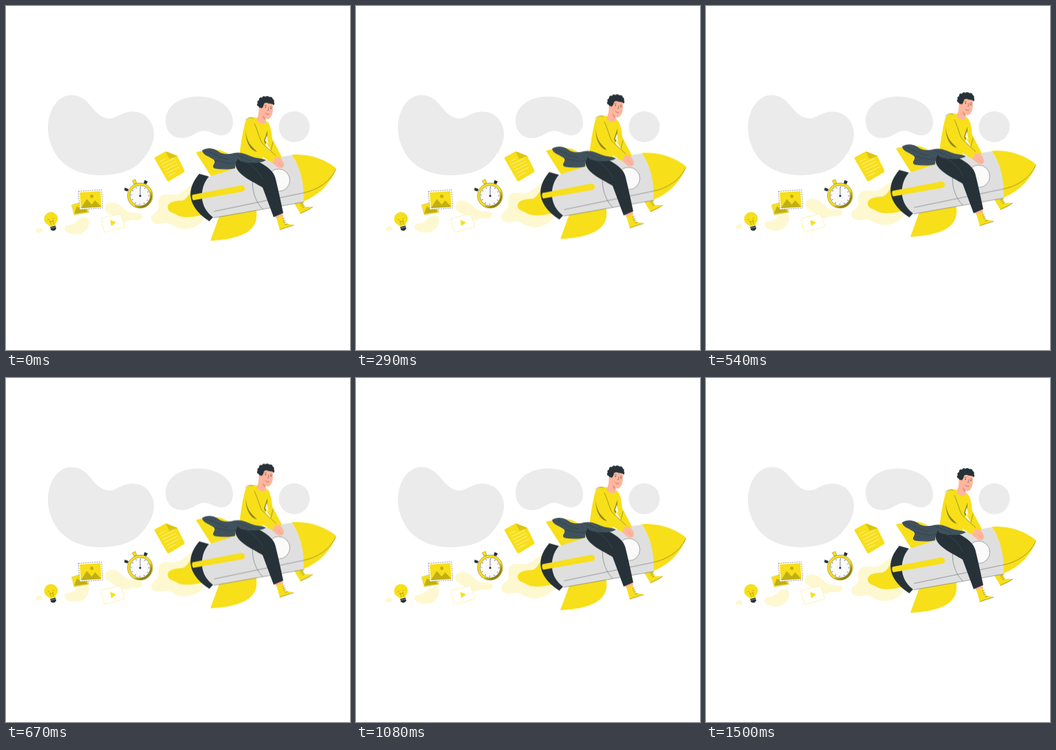
Animation, 500 px wide and 500 px high, one loop 1.54 s. Source, as an HTML page:

```html
<!DOCTYPE html>
<html lang="en">
<head>
<meta charset="utf-8">
<title>Rocket ride</title>
<style>
  html, body { margin: 0; width: 100%; height: 100%; overflow: hidden; background: #fff; }
  svg { display: block; width: 100%; height: 100%; }
  .float { animation: float 1540ms -40ms cubic-bezier(.37, 0, .63, 1) infinite; }
  @keyframes float {
    0%, 100% { transform: translateY(.9px); }
    50% { transform: translateY(-5.7px); }
  }
  .cloud { fill: #ebebeb; }
  .puff { fill: #fdf8d0; }
  .yellow { fill: #f7df1a; }
  .olive { fill: #c2af16; }
  .shade { fill: #8f8112; }
  .dark { fill: #263238; }
  .skin { fill: #ffb59d; }
  .line { fill: none; stroke: #263238; stroke-width: .6; stroke-linecap: round; stroke-linejoin: round; }
  .thin { stroke-width: .4; }
  .white { fill: none; stroke: #fdf3a8; stroke-width: .9; }
</style>
</head>
<body>
<svg viewBox="0 0 500 500">
  <defs>
    <pattern id="denim" width="5" height="4" patternUnits="userSpaceOnUse" patternTransform="rotate(24)">
      <rect width="5" height="4" fill="#3c4d57"/>
      <path d="M.5 1h1.400M3 2.800h1.300" stroke="#7d909a" stroke-width=".5"/>
    </pattern>
  </defs>

  <g class="cloud">
    <path d="M95 129.500C115 129.500 122 146 133 156C142 164 151 166 162 160C171 155 177 153.500 184 153.500C203 153.500 215 169 215 186C215 203 203 220 192 230C179 241 158 246 137 246C104 246 80 231 70 211C63 198 61 187 61 177C61 152 75 129.500 95 129.500Z"/>
    <path d="M278 131.500C306 131 330 146 330 169C330 181 322 188 313 188C303 188 298 181.500 288 181.500C276 181.500 271 192 256 192C241 192 232 181 232 167C232 144 254 132 278 131.500Z"/>
    <circle cx="419" cy="175.500" r="22.500"/>
  </g>

  <!-- smoke trail -->
  <g class="float puff">
    <path d="M43 326C43 323 46 324 47 322C50 321 52 322 53 325C54 328 51 329 48 328.500C45 329 43 329 43 326Z"/>
    <path d="M85 321C87 316 94 319 99 315C104 311 107 306 115 306C121 306 122 313 120 318C117 326 111 331 102 331C93 331 84 328 85 321Z"/>
    <path d="M144.500 291C146 285 153 283 160 285.500C168 288 171 296 180 299C189 301 198 299 198.500 305C198 311 190 311 184 310C178 310 176 314 170 313C162 311 158 305 151 302C145 299 143 295 144.500 291Z"/>
    <path d="M272 259C262 262 258 270 249 273C240 275 230 270 224 276C219 282 223 290 221 295C218 300 211 302 211 308C211 316 221 317 230 315C240 313 243 322 258 323C272 324 283 316 288 309L286 260Z"/>
    <path class="yellow" d="M274 267C265 269 265 280 256 282C246 282 236 284 235 291C235 299 242 299 247 302C254 307 264 306 272 305.500L290 302Z"/>
  </g>

  <!-- light bulb -->
  <g transform="rotate(-14 65.500 310)">
    <path class="yellow" d="M61.500 320C61 317 55.500 315 55.500 309.500A10 10 0 0 1 75.500 309.500C75.500 315 70 317 69.500 320Z"/>
    <path class="dark" d="M61.500 320.500H69.500V325L67 327H64L61.500 325Z"/>
    <path d="M61.500 322.500h8" stroke="#fff" stroke-width=".4"/>
    <path class="line thin" d="M64 318L63 312L65.500 314L68 312L67 318M61 309.500h1.500M68 309.500h1.500" style="stroke:#6d6420"/>
  </g>

  <!-- pictures -->
  <path d="M95 289L115 283L121 300L99 304Z" class="yellow" stroke="#ddd" stroke-width=".7"/>
  <path class="olive" d="M99 302L103 291L109 296L113 291L119 299.500Z"/>
  <g transform="translate(123 281.500) rotate(-4)">
    <rect x="-16.800" y="-13.300" width="33.600" height="26.600" fill="#fff" stroke="#888" stroke-width=".8" stroke-dasharray="2 1.300"/>
    <rect class="yellow" x="-15" y="-11.500" width="30" height="23"/>
    <path class="olive" d="M-15 11.500L-5.500-1.500L1 7L6.500 1.500L15 11.500Z"/>
    <circle class="olive" cx="2" cy="-4.800" r="2.500"/>
  </g>

  <!-- video card -->
  <path d="M139 308.500L164 302.300Q166 302 166.800 303.500L172.500 319Q173 321 171 321.500L145 328.500Q143 329 142.500 327L138 311Q137.500 309 139 308.500Z" fill="#fff" stroke="#faf0a0" stroke-width=".8"/>
  <path class="yellow" d="M151.500 311L160 314.500L153 320Z"/>

  <!-- stopwatch -->
  <g>
    <path class="yellow" d="M183.500 254L188 252L190 257.500L186 259Z" stroke="#8f8112" stroke-width=".5"/>
    <path class="dark" d="M201.500 253L206 255L204 259L200 257.500ZM172.500 264L178 266L176.500 269.500L172 268Z"/>
    <path class="line" d="M176 267L180 269M202 257L200 261"/>
    <circle class="yellow" cx="194.900" cy="275.600" r="18.300" stroke="#6d6420" stroke-width=".5"/>
    <path class="shade" d="M210 269A16.300 16.300 0 0 1 186 290A18 18 0 0 0 210 269Z"/>
    <circle cx="194.900" cy="275.600" r="14.800" fill="#fafafa" stroke="#5d5a30" stroke-width=".5"/>
    <circle cx="194.900" cy="275.600" r="12.700" fill="none" stroke="#4a5358" stroke-width="2" stroke-dasharray=".7 5.950"/>
    <path class="line" d="M195 276V264"/>
    <circle class="dark" cx="195" cy="276" r="1.600"/>
  </g>

  <!-- document -->
  <path class="yellow" d="M217 219.500L231 212Q233 211 235 212L249 218L259.300 239Q260 241 258 242L237 254.500Q235 255.500 234 253.500L216 222Q215 220.500 217 219.500Z"/>
  <path d="M232 211.500L249.500 218L237.500 222Z" fill="#d9c418"/>
  <path class="white" d="M223 226.500L232 222M225.500 230.500L245 221.500M228 235L247 225.500M230.500 239L249.500 229.500M233 243.500L252 234M235.500 247.500L246 242"/>

  <!-- rocket and rider -->
  <g class="float">
    <g>
      <path class="yellow" d="M419 286L431 282L434 291L446 291C440 296 433 299 428 301Z"/>
      <path class="line thin" d="M428 287l3-1M429 289.500l3-1M431 292l3-1.500M428 300.500C435 297 441 295 446 291"/>
    </g>
    <path class="yellow" d="M276 212C290 208 305 206 315 210C330 216 338 227 341 235L299 248Z"/>
    <path class="yellow" d="M311 302L297 340.300C326 339 353 333 361.500 316C365 309 364.500 302 363.500 293Z"/>
    <path class="dark" d="M281 243L295 247C283 264 286 291 303 304L295.500 312C262 290 262 265 281 243Z"/>
    <path d="M294 248C281 264 280 292 302 307L433 284C436 258 428 232 415 216C380 221 330 235 294 248Z" fill="#dfdfdf"/>
    <path class="yellow" d="M415 215.500C440 213 464 222 480 235C473 255 456 274 432.500 283C434 258 428 232 415 215.500Z"/>
    <path class="line thin" d="M303 297.500L431 271C452 267 471 255 479 237M302 307L433 284M362 235C355 250 357 279 373 294"/>
    <path class="yellow" d="M271 273.500L341 260C348 259 349.500 267.500 343 269L272 281.500C270 279 270 276 271 273.500Z"/>
    <circle cx="396.300" cy="252.300" r="16.300" fill="#fafafa" stroke="#555" stroke-width=".5"/>

    <!-- near leg -->
    <path class="skin" d="M389 303L402 299L403 306L394 309Z"/>
    <path class="yellow" d="M393 307L402 304.500L406 315L418.500 317.500C412 320 405 322 398 324.500Z"/>
    <path class="line thin" d="M402 308.500l3-1M403 311.500l3-1M404 314l3-1M406 317l3-1M398 324.300C405 321.500 412 320 418 317.800"/>
    <path class="dark" d="M336 220C346 217 360 221 368 226C379 232 389 239 391.500 249C395 263 399 281 403 300L389 306L373 263C359 254 338 246 334 232C333 226 333 222 336 220Z"/>
    <path d="M345 225C357 229 367 238 373 251" fill="none" stroke="#4c5b63" stroke-width=".5"/>

    <!-- jumper -->
    <path class="yellow" d="M378 168C385 172 386 181 387 192L401 219L394 225L378 197Z"/>
    <path class="yellow" d="M347.500 169C350 160 358 160 366 162L378 166C384 170 386 177 382 190L375 206L373 222C362 221 350 219 339.500 215C341 202 343.500 184 347.500 169Z"/>
    <path class="shade" d="M380 180C380 188 379 194 377 200L375 195ZM348.500 180C349 194 355 204 367 211C356 211 348 198 348.500 180Z"/>
    <path d="M379 187L381.500 199L376.500 195Z" fill="#fff"/>
    <path class="yellow" d="M351 164C361 162 367 178 371 194C377 203 386 210 392 217L387 227C372 219 360 208 355 198C351 188 347 174 351 164Z"/>
    <path class="line thin" d="M361 170C366 180 368 191 372 198L392 216.500M388 197L385 209M348 165C352 161 355 161 359 162"/>
    <path class="skin" d="M391 219C397 217 402 222 404 229C404 235 399 236 394 233L387 227Z"/>
    <path class="line thin" d="M396 227L402 233" style="stroke:#d88672"/>

    <!-- head -->
    <path class="skin" d="M368 145C371 137 384 136 387.500 142C389 152 387 160 382 163C380 164 378 163 377 162L378 168C374 172 367 170 364 165L367 157Z"/>
    <path d="M373 158L377 162L377.300 165C375 164 373 162 373 158Z" fill="#e8907b"/>
    <path class="dark" d="M370 148.500C368 147 368 145 366 144.500C364 143 365 141 366 140C364 138 367 136 368 136C367 133 370 131 372 132.500C373 129.500 376 130 377 131C379 129 382 130 383 131.500C385 130.500 388 132 387.500 134C390 135 390 137 389.500 139C391 141 390 142 389 143.500C387 140 384 142 381 140.500C378 139 375 140 374.500 143C374 146 372 148 370 148.500Z"/>
    <circle class="skin" cx="369.500" cy="149" r="2"/>
    <path class="line thin" d="M381.500 146.500L381.800 150.500L380 150.500M375.500 143.500L378.500 143.500M384 145.500L386.500 146M377 154.500C378.500 156.500 380 156.800 382 156.300"/>
    <circle class="dark" cx="377.300" cy="146" r=".8"/>
    <circle class="dark" cx="385" cy="148" r=".8"/>

    <!-- jacket round the waist -->
    <path d="M285 209C291 205 301 205 308 210C314 215 322 215 331 213C343 210 352 217 362 219.500C368 220.500 374 221 378 223C373 227 362 227.500 353 227C346 225 341 227 337 221C334 226 333 231 333 235C325 237 314 237 304 235.500C296 232 307 228 302 222.500C296 218 286 216 285 209Z" fill="url(#denim)"/>
    <path class="line thin" d="M303 223C315 225 325 230 335 226M331 213C338 217 347 220 356 224M290 210C302 213 311 221 323 222"/>
  </g>
</svg>
</body>
</html>
```
